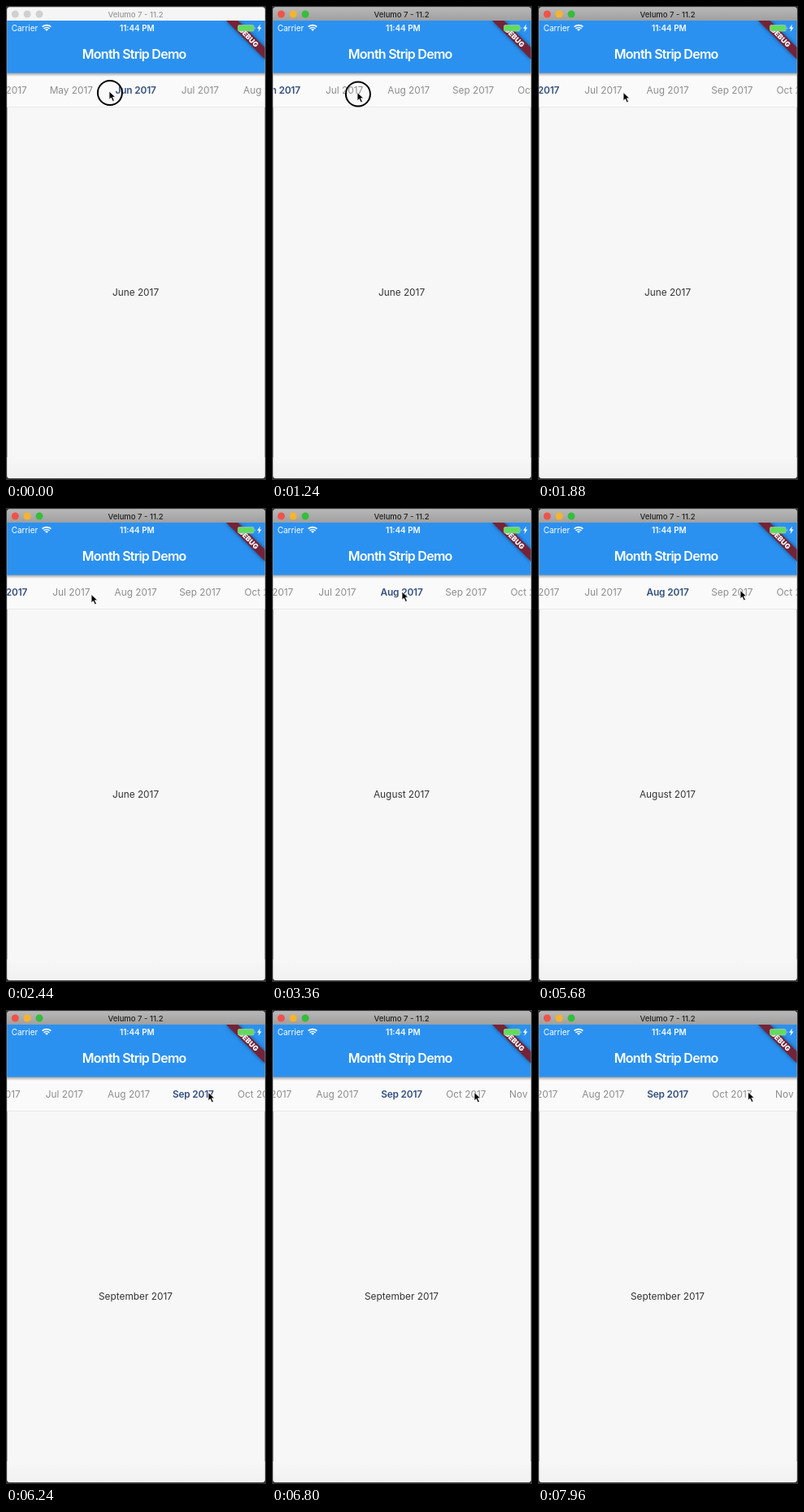
Animation of 320 by 584 pixels, one loop 8 s. Source, as an HTML page:

```html
<!DOCTYPE html>
<html lang="en">
<head>
<meta charset="utf-8">
<title>Month strip</title>
<style>
  html, body { margin: 0; width: 100%; height: 100%; overflow: hidden; background: #333; }
  svg { display: block; width: 100vw; height: 100vh; }
  text { font-family: Inter, "Open Sans", sans-serif; text-anchor: middle; }
  #strip text, #label { font-size: 11.85px; }
  #strip text { fill: #8d8d8d; }
  #strip text.selected { fill: #35507e; font-weight: 600; letter-spacing: -.15px; }
  #banner { filter: drop-shadow(0 0 2.5px rgba(0, 0, 0, .5)); }
</style>
</head>
<body>
<svg viewBox="0 0 320 584">
  <defs>
    <linearGradient id="activeBar" x2="0" y2="1">
      <stop stop-color="#bababa"/><stop offset="1" stop-color="#9f9f9f"/>
    </linearGradient>
    <linearGradient id="shadow" x2="0" y2="1">
      <stop stop-color="#000" stop-opacity=".38"/><stop offset="1" stop-color="#000" stop-opacity="0"/>
    </linearGradient>
    <linearGradient id="floor" x2="0" y2="1">
      <stop stop-color="#f7f7f7"/><stop offset="1" stop-color="#f1f1f1"/>
    </linearGradient>
    <clipPath id="window"><rect x="1.4" y="1.4" width="317.2" height="580.4" rx="3"/></clipPath>
  </defs>
  <rect width="320" height="584" fill="#333"/>
  <g clip-path="url(#window)">
    <rect width="320" height="584" fill="#f7f7f7"/>
    <rect y="556" width="320" height="26" fill="url(#floor)"/>
    <rect y="82" width="320" height="42" fill="#fafafa"/>
    <rect y="124" width="320" height="1" fill="#e9e9e9"/>
    <g id="strip"></g>
    <text id="label" x="159.5" y="357" fill="#333"></text>

    <rect y="82" width="320" height="5" fill="url(#shadow)"/>
    <rect y="18" width="320" height="64.5" fill="#2b91f0"/>
    <g fill="#fff">
      <text x="157.7" y="65" font-size="16" font-weight="600" letter-spacing="-.75">Month Strip Demo</text>
      <text x="23" y="31" font-size="10">Carrier</text>
      <text x="161.3" y="31" font-size="9.9" font-weight="600">11:44 PM</text>
      <path d="M50 31l-2-2.2a3 3 0 0 1 4 0z"/>
    </g>
    <path d="M44.6 25.7a8 8 0 0 1 10.8 0M46.5 27.8a5.2 5.2 0 0 1 7 0" fill="none" stroke="#fff" stroke-width="1.6"/>

    <path id="banner" d="M271 18h14.4L319 51.6V66z" fill="#742338"/>
    <text transform="translate(298.6 38.4) rotate(45)" y="3.1" font-size="8.7" font-weight="900" fill="#fff">DEBUG</text>
    <rect x="285.5" y="23.5" width="19.5" height="7.5" rx="1.5" fill="#63db5b" stroke="#a9cbbd" stroke-width=".7"/>
    <path d="M306 25.5q1.5 1.7 0 3.5z" fill="#c8dcf2"/>
    <path d="M313 22.5l-4 5.3h2.3l-.8 4.2 4-5.5h-2.4z" fill="#fff"/>

    <rect id="bar" width="320" height="18"/>
    <circle class="light" cx="11.3" cy="10" r="4.5"/>
    <circle class="light" cx="26.1" cy="10" r="4.5"/>
    <circle class="light" cx="41" cy="10" r="4.5"/>
    <text id="device" x="159.5" y="13.7" font-size="9.5" font-weight="500">Velumo 7 - 11.2</text>
  </g>
  <g id="pointer">
    <circle id="press" cx=".9" cy="2" r="15" fill="none" stroke="#000" stroke-width="2"/>
    <path d="M0 0V10.3l2.4-2.2 2 4.4 2-.9-2-4.3h3.3z" fill="#000" stroke="#fff" stroke-width=".8"/>
  </g>
</svg>
<script>
const LOOP = 8000, CENTER = 159.6, PITCH = 79.25, FIRST = 2;
const MONTHS = ["January", "February", "March", "April", "May", "June",
  "July", "August", "September", "October", "November", "December"];

// Tracks hold [time, value...] stops.
const POINTER = [[0, 127, 105], [160, 127, 105], [500, 255, 106], [580, 255, 106],
  [1150, 105, 106.5], [2600, 105, 106.5], [3000, 160, 103], [3400, 160, 103],
  [4000, 228.5, 111.5], [4400, 228.5, 111.5], [4950, 249, 101.5],
  [6850, 249, 101.5], [7500, 258.5, 101]];
const SCROLL = [[0, 5], [580, 5], [1150, 6.89], [1400, 6.89], [1700, 7], [6180, 7], [6480, 8]];
const PRESSES = [[0, 160], [560, 1400], [3090, 3220], [6050, 6180]];
const SELECTION = [[0, 5], [3220, 7], [6180, 8]];

const byId = id => document.getElementById(id);
const lights = document.querySelectorAll(".light");
const items = MONTHS.slice(FIRST).map(name => {
  const item = document.createElementNS("http://www.w3.org/2000/svg", "text");
  item.textContent = name.slice(0, 3) + " 2017";
  item.setAttribute("y", 107.5);
  byId("strip").append(item);
  return item;
});

function sample(track, time) {
  const next = track.findIndex(stop => stop[0] > time);
  if (next < 0) return track.at(-1).slice(1);
  const [start, ...from] = track[next - 1], [end, ...to] = track[next];
  const p = (time - start) / (end - start), eased = p * p * (3 - 2 * p);
  return from.map((value, i) => value + (to[i] - value) * eased);
}

function render(time) {
  const [x, y] = sample(POINTER, time);
  const [scroll] = sample(SCROLL, time);
  const selected = SELECTION.findLast(stop => stop[0] <= time)[1];
  const pressed = PRESSES.some(([down, up]) => time >= down && time < up);
  const active = time >= 40;

  items.forEach((item, i) => {
    const month = i + FIRST;
    item.setAttribute("x", CENTER + (month - scroll) * PITCH);
    item.classList.toggle("selected", month === selected);
  });
  byId("label").textContent = MONTHS[selected] + " 2017";
  byId("pointer").setAttribute("transform", `translate(${x} ${y})`);
  byId("press").style.display = pressed ? "" : "none";

  byId("bar").setAttribute("fill", active ? "url(#activeBar)" : "#f5f5f5");
  byId("device").setAttribute("fill", active ? "#222" : "#999");
  ["#f0524a", "#f5b32f", "#35bd3c"].forEach((color, i) =>
    lights[i].setAttribute("fill", active ? color : "#d0d0d0"));
}

const began = performance.now();
function tick() {
  render((performance.now() - began) % LOOP);
  requestAnimationFrame(tick);
}
tick();
</script>
</body>
</html>
```
